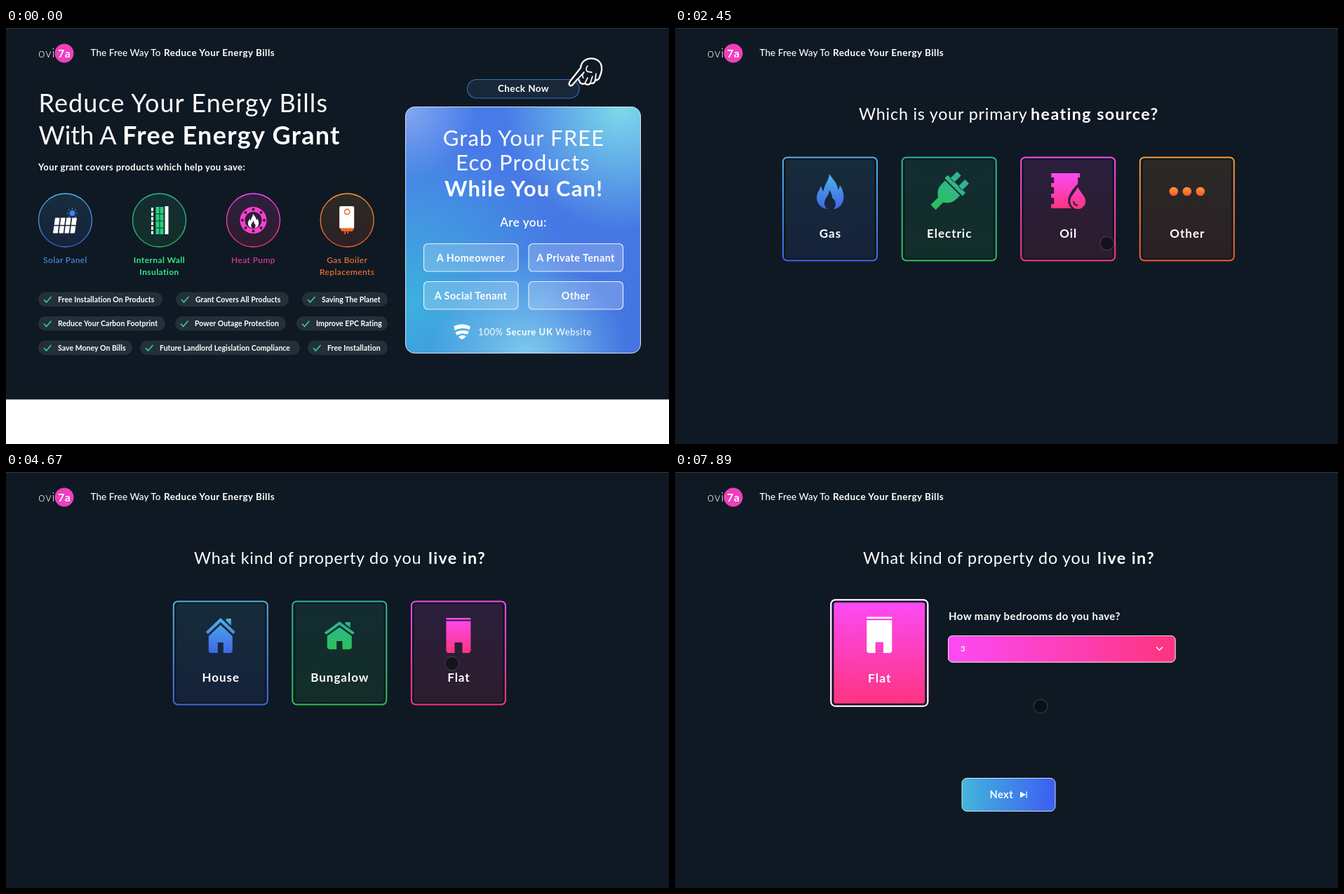
These frames come from a looping animation (945 by 593 pixels, 8000 ms). An HTML page:

```html
<!DOCTYPE html>
<html lang="en">
<head>
<meta charset="utf-8">
<title>Energy grant form</title>
<style>
html, body { margin: 0; width: 100%; height: 100%; overflow: hidden; background: #0f1923; }
svg { display: block; width: 945px; height: 593px; }
text { font-family: Lato, "Open Sans", sans-serif; white-space: pre; }
</style>
</head>
<body>
<svg id="stage" viewBox="0 0 945 593" xmlns="http://www.w3.org/2000/svg"></svg>
<script>
const LOOP = 8000, BG = '#0f1923';
const hues = {
  blue: ['#4fb2e8', '#3f66e6'],
  green: ['#2fb498', '#2bc157'],
  pink: ['#fc4af5', '#fd347f'],
  orange: ['#f79a3b', '#f4572c']
};

// ---------- markup helpers ----------
const text = (x, y, size, str, { w = 700, a = 'start', ls = .03, fill = '#fff', id = '' } = {}) =>
  `<text ${id && `id="${id}"`} x="${x}" y="${y}" font-size="${size}" font-weight="${w}" text-anchor="${a}" letter-spacing="${(ls * size).toFixed(2)}" fill="${fill}">${str}</text>`;
const mid = (x, y, size, str, o = {}) => text(x, y, size, str, { a: 'middle', ...o });
const rect = (x, y, w, h, r, attrs) =>
  `<rect x="${x}" y="${y}" width="${w}" height="${h}" rx="${r}" ${attrs}/>`;
const path = (d, attrs) => `<path d="${d}" ${attrs}/>`;
const circle = (x, y, r, attrs) => `<circle cx="${x}" cy="${y}" r="${r}" ${attrs}/>`;
const group = (id, body, attrs = '') => `<g id="${id}" ${attrs}>${body}</g>`;
const grad = (id, [c1, c2], dir = 'x2="0" y2="1"') =>
  `<linearGradient id="${id}" ${dir}><stop stop-color="${c1}"/><stop offset="1" stop-color="${c2}"/></linearGradient>`;
const glow = (id, color, cx, cy, r, o) =>
  `<radialGradient id="${id}" cx="${cx}" cy="${cy}" r="${r}"><stop stop-color="${color}" stop-opacity="${o}"/><stop offset="1" stop-color="${color}" stop-opacity="0"/></radialGradient>`;

const defs = `<defs>
  ${Object.keys(hues).map(k => grad(k, hues[k])).join('')}
  ${grad('hotRow', hues.pink, '')}
  ${grad('next', ['#43b6dc', '#3c5df2'], '')}
  ${grad('panel', ['#4a7cea', '#4476e0'], 'x2="1" y2="1"')}
  ${glow('glowCorner', '#93b4f2', 0, 0, .3, .8)}
  ${glow('glowTop', '#7fe0ea', .92, 0, .5, .95)}
  ${glow('glowLeft', '#3cb4dc', .02, .8, .68, .95)}
  ${glow('glowBase', '#86d4ee', .52, 1.02, .42, .9)}
  <clipPath id="listClip"><rect id="listMask" x="388" y="230" width="327" height="0"/></clipPath>
</defs>`;

// ---------- icons, centred on 0,0 ----------
const house = 'M0-25L21-5L18-2L0-19L-18-2L-21-5ZM8-24h7v10l-7-7ZM0-15L17 1V21Q17 25 13 25H4V10H-4V25H-13Q-17 25-17 21V1Z';
const dot = x => `M${x - 6.3} 0a6.3 6.3 0 1 0 12.6 0a6.3 6.3 0 1 0-12.6 0Z`;
const flame = 'M-1-25C4-17 12-10 11-2C13-4 14-7 14-9C19-2 21 8 18 15C16 21 10 25 5 25C10 20 8 12 3 9C3 4 1 1-1-2C-1 6-8 9-8 17C-8 21-6 23-4 25C-12 24-19 18-19 9C-19 2-15-2-13-8C-12-4-11-2-9 0C-9-10-2-14-1-25Z';
const icons = {
  Gas: [flame],
  Electric: ['M-12-28h8v14h-8ZM4-28h8v14h-8ZM-18-15H18v6H-18ZM-15-7H15V0C15 9 10 14 5 17V32H-5V17C-10 14-15 9-15 0Z', 'rotate(45)'],
  Oil: ['M-24-26H17v6h-3v9C8-5 0 5 0 13C0 18 2 21 5 24H-24v-6h4v-9h-4v-6h4v-9h-4v-6h4V-20h-4ZM14-6C18 2 25 7 25 14A11 11 0 0 1 3 14C3 7 10 2 14-6ZM7 14H9A5 5 0 0 0 14 19V21A7 7 0 0 1 7 14Z'],
  Other: [dot(-19) + dot(0) + dot(19)],
  House: [house],
  Bungalow: [house, 'scale(1.03 .79)'],
  Flat: ['M-17.5-25h35v2.5h-35ZM-17.5-20.5h35V21q0 4-4 4h-8V10h-11V25h-8q-4 0-4-4Z']
};

// ---------- answer cards ----------
const CARD_TOP = 183.5;
function card(name, hue) {
  const [d, tf = ''] = icons[name];
  const icon = fill => `<g transform="translate(0 -25)">${path(d, `transform="${tf}" fill="${fill}" fill-rule="evenodd"`)}</g>`;
  const frame = stroke => rect(-67, -73.5, 134, 147, 6, `fill="none" stroke="${stroke}" stroke-width="2"`);
  const inner = attrs => rect(-63, -70, 126, 140, 3, attrs);
  return group('card' + name,
    rect(-68, -74.5, 136, 149, 7, `fill="${BG}"`) + frame(`url(#${hue})`) +
    inner(`fill="url(#${hue})" fill-opacity=".12"`) + icon(`url(#${hue})`) +
    group('on' + name, frame('#fff') + inner('fill="url(#pink)"') + icon('#fff'), 'opacity="0"') +
    mid(.5, 41, 17, name, { ls: .058 }));
}

// ---------- landing page ----------
function medallion(x, hue, lines, icon, color, w) {
  return circle(x, 274, 38, `fill="url(#${hue})" fill-opacity=".13" stroke="url(#${hue})" stroke-width="1.3"`) +
    `<g transform="translate(${x} 274)">${icon}</g>` +
    lines.map((s, i) => mid(x, 334.5 + 17.3 * i, 12, s, { w, ls: .033, fill: color })).join('');
}
const ring = (n, r, fn) => Array.from({ length: n }, (_, i) => {
  const a = i * 2 * Math.PI / n;
  return fn(r * Math.cos(a), r * Math.sin(a), a * 180 / Math.PI);
}).join('');

const solar = path('M-14-3H16L13 18H-17Z', 'fill="#fff" stroke="#fff" stroke-linejoin="round"') +
  path('M-17 7.5H15M-7-4L-10 19M1-4L-2 19M9-4L6 19', 'stroke="#142536" stroke-width="1.7"') +
  circle(10, -10, 4, 'fill="#3f86e8"') +
  ring(8, 6.3, (x, y, a) => rect(-.7, -.7, 2, 1.4, .5, `fill="#3f86e8" transform="translate(${10 + x} ${y - 10}) rotate(${a})"`));
const wall = path('M-10-18V20', 'stroke="#fff" stroke-width="3" stroke-dasharray="5 1.7"') +
  rect(-5, -19, 11, 39, 0, 'fill="#2bd07f"') +
  path('M.5-19V20M-5-9H6M-5 1H6M-5 11H6', 'stroke="#123030" stroke-width="1"') +
  rect(8, -20, 5, 40, 0, 'fill="#fff"');
const pump = circle(0, 0, 15.5, 'fill="none" stroke="#f93fd2" stroke-width="7"') +
  ring(8, 15.5, (x, y) => circle(x, y, 2, 'fill="#2b1a35"')) +
  path(flame, 'fill="#fff" transform="translate(0 1) scale(.4)"');
const boiler = rect(-11, -20, 21, 32, 2, 'fill="#fff"') +
  circle(0, -12, 3.6, 'fill="none" stroke="#f4692c" stroke-width="1.6"') +
  path('M-9 12H9L7 15H-7ZM-3 15V20M1 15V19', 'fill="#f4692c" stroke="#f4692c" stroke-width="1.6"');

const pills = [
  [46, 376.5, 177, 'Free Installation On Products'], [242, 376.5, 161, 'Grant Covers All Products'], [422, 376.5, 122, 'Saving The Planet'],
  [46, 411, 181, 'Reduce Your Carbon Footprint'], [241, 411, 158, 'Power Outage Protection'], [414, 411, 130, 'Improve EPC Rating'],
  [46, 445.5, 134, 'Save Money On Bills'], [191, 445.5, 228, 'Future Landlord Legislation Compliance'], [430, 445.5, 114, 'Free Installation']
].map(([x, y, w, s]) => rect(x, y, w, 20.5, 10.2, 'fill="#252f39"') +
  path(`M${x + 8} ${y + 10.5}l3.5 4l7-8`, 'fill="none" stroke="#2fd784" stroke-width="1.5"') +
  text(x + 28, y + 14, 10.5, s, { ls: .005 })).join('');

const choices = [[595, 307, 'A Homeowner'], [744.5, 307, 'A Private Tenant'], [595, 361, 'A Social Tenant'], [744.5, 361, 'Other']]
  .map(([x, y, s]) => rect(x + .5, y + .5, 134.5, 39.5, 6, 'fill="#fff" fill-opacity=".2" stroke="#e6f1ff" stroke-width="1.1"') +
    mid(x + 67.5, y + 25.5, 14.4, s)).join('');

const shield = path('M638.5 425Q650 419.5 661.5 425L661 430Q650 425.5 639.5 431ZM640.5 433.5Q650 429 660 432.5L657.5 437Q650 433.5 642.5 438ZM645 440Q650 436.5 656 439.5Q653 443 649.5 444Q646.5 442.5 645 440Z', 'fill="#fff"');

const hand = path('M804 82Q801.5 80 804 76L819 57Q820 47 829 44Q842 41 848 51Q851 59 846.5 69Q845 75 840 74Q839 80 833.5 78.5Q830 82.5 825.5 79Q819.5 81 817.5 76L815.5 72L808 80.5Q806 83 804 82Z', `fill="${BG}" stroke="#fff" stroke-width="2.3" stroke-linejoin="round"`) +
  path('M815.5 72L824 63M825 79L829 71M833 78L836 69M840 74L841 65M824 63Q820 67 823 71M829 54Q825 59 829 62L835 63', 'fill="none" stroke="#fff" stroke-width="1.7" stroke-linecap="round"');

const landing = rect(0, 529.5, 945, 64, 0, 'fill="#fff"') +
  text(46.5, 120, 36, 'Reduce Your Energy Bills', { w: 400 }) +
  text(46.5, 165.5, 36, 'With A', { w: 400, ls: 0 }) + text(166, 165.5, 36, 'Free Energy Grant', { ls: .036 }) +
  text(46, 202.5, 13, 'Your grant covers products which help you save:') +
  medallion(84.5, 'blue', ['Solar Panel'], solar, '#4a90ee', 500) +
  medallion(218.5, 'green', ['Internal Wall', 'Insulation'], wall, '#2fe98a', 700) +
  medallion(352.5, 'pink', ['Heat Pump'], pump, '#e43aa0', 500) +
  medallion(486.2, 'orange', ['Gas Boiler', 'Replacements'], boiler, '#f6762f', 500) +
  pills +
  rect(657.5, 73.5, 159.5, 26.5, 13.2, 'fill="#182838" stroke="#2f74c4" stroke-width="1.1"') +
  mid(737.5, 91.3, 13.5, 'Check Now') +
  ['panel', 'glowCorner', 'glowTop', 'glowLeft', 'glowBase'].map(f => rect(569.5, 112.5, 335, 351, 13, `fill="url(#${f})"`)).join('') +
  rect(569.5, 112.5, 335, 351, 13, 'fill="none" stroke="#cfe4fb" stroke-width="1"') +
  mid(738, 167.5, 31, 'Grab Your FREE', { w: 400, ls: .035 }) +
  mid(737, 203, 31, 'Eco Products', { w: 400, ls: .038 }) +
  mid(738, 240, 31, 'While You Can!', { ls: .037 }) +
  mid(737.5, 283, 17, 'Are you:', { w: 600 }) + choices + shield +
  text(673, 438, 13, '100% <tspan font-weight="700">Secure UK</tspan> Website', { w: 400, ls: .05 }) +
  group('hand', hand);

// ---------- question pages ----------
const title = (x, a, x2, b) => text(x, 131, 23.3, a, { w: 400, ls: .034 }) + text(x2, 131, 23.3, b, { ls: .06 });
const heating = group('titleHeat', title(262, 'Which is your primary', 507, 'heating source?')) +
  card('Gas', 'blue') + card('Electric', 'green') + card('Other', 'orange') + card('Oil', 'pink');

const listRows = [1, 2, 3, 4, 5].map((n, i) => text(407, 288 + 27.1 * i, 11, n) +
  path(`M390 ${297.5 + 27.1 * i}H712`, `stroke="${['#2e6466', '#3d4d58', '#6d4a86', '#3d4d58', '#8d4686'][i]}"`)).join('');
const dropdown = group('drop',
  text(390, 211, 15, 'How many bedrooms do you have?', { ls: .028 }) +
  rect(389.5, 233.5, 323.5, 37.5, 6, 'fill="#25303a" stroke="#c9ced3"') +
  group('list', rect(389.5, 233.5, 323, 179, 6, 'fill="#283842" stroke="url(#hotRow)" stroke-width="1.1"') +
    path('M390 270.5H712', 'stroke="#b343b0"') + listRows +
    rect(707.5, 274, 2, 70, 1, 'fill="#6b7983"'), 'clip-path="url(#listClip)"') +
  group('hot', rect(389.5, 233.5, 323.5, 37.5, 6, 'fill="url(#hotRow)" stroke="#fbd7ea"')) +
  text(407, 255.5, 11.5, 'Select number...', { id: 'value' }) +
  path('M686 249.5l4.5 4.5l4.5-4.5', 'fill="none" stroke="#fff" stroke-width="1.5"'));
const next = group('nextBtn', rect(409, 436.5, 133, 47, 7, 'fill="url(#next)" stroke="#cfe3fb"') +
  text(448.5, 465, 14.5, 'Next', { ls: .035 }) +
  path('M492 455.5L500 460L492 464.5ZM500.5 455.5h1.3v9h-1.3Z', 'fill="#fff"'));
const property = title(268, 'What kind of property do you', 602, 'live in?') +
  dropdown + card('House', 'blue') + card('Bungalow', 'green') + card('Flat', 'pink') + next;

const header = rect(0, 0, 945, 1, 0, 'fill="#33383d"') +
  circle(83, 36, 13.5, 'fill="#ef3fbd"') +
  text(46, 41.5, 17, 'ovi', { w: 300, ls: .05 }) + text(74, 41.5, 16, '7a') +
  text(120.5, 40, 13.5, 'The Free Way To', { w: 500, ls: .005 }) + text(225, 40, 13.5, 'Reduce Your Energy Bills', { ls: .034 });

const stage = document.getElementById('stage');
stage.innerHTML = defs + rect(0, 0, 945, 593, 0, `fill="${BG}"`) +
  group('landing', landing) + group('heating', heating) + group('property', property) + header +
  group('cursor', circle(0, 0, 9.8, 'id="disc" stroke-width="1.3"'));

// ---------- motion ----------
const el = id => document.getElementById(id);
const ramp = (t, start, dur) => Math.min(1, Math.max(0, (t - start) / dur));
const swing = (t, start, dur) => .5 - .5 * Math.cos(Math.PI * ramp(t, start, dur));
const show = (id, on) => el(id).setAttribute('display', on ? 'inline' : 'none');
const fade = (id, o) => el(id).setAttribute('opacity', o.toFixed(3));
const move = (id, x, y, s = 1) => el(id).setAttribute('transform', `translate(${x.toFixed(2)} ${y.toFixed(2)}) scale(${s.toFixed(4)})`);

function place(name, x, dy, opacity, sel = 0) {
  move('card' + name, x, CARD_TOP + 74.5 + dy, 1 + .03 * sel);
  fade('card' + name, opacity);
  fade('on' + name, sel);
}

// start, end, x, y
const trail = [[70, 940, 672, 328], [2130, 2740, 568, 289], [4400, 4860, 674, 264], [5400, 6030, 626, 259], [6660, 7030, 521, 334]];
function pointer(t) {
  let x = 896, y = 612;
  for (const [from, to, tx, ty] of trail) {
    const k = swing(t, from, to - from);
    x += (tx - x) * k;
    y += (ty - y) * k;
  }
  return [x, y];
}

function render(t) {
  const first = t < 1640;
  show('landing', first);
  show('heating', !first && t < 4400);
  show('property', t > 3576);

  const bob = 10 - 10 * Math.cos(2 * Math.PI * (t + 174) / 1744);
  move('hand', bob - 2, 2 - bob);

  const leave = swing(t, 3005, 800), turn = swing(t, 3576, 800);
  fade('titleHeat', 1 - leave);
  place('Gas', 221, 150 * leave, 1 - leave);
  place('Electric', 390.7, 150 * leave, 1 - leave);
  place('Other', 729.8, 150 * leave, 1 - leave);
  place('Oil', 560.2, -150 * turn, 1 - turn, ramp(t, 2930, 530));

  fade('property', turn);
  const drop = swing(t, 4998, 800), slide = swing(t, 4988, 400);
  place('House', 305.8, 150 * drop, 1 - drop);
  place('Bungalow', 475.3, 150 * drop, 1 - drop);
  place('Flat', 644.9 - 353.6 * slide, 0, 1, ramp(t, 4860, 490));
  move('drop', 0, -80 * (1 - slide));
  fade('drop', slide);

  const chosen = t >= 7080;
  const open = chosen ? 1 - ramp(t, 7080, 140) : swing(t, 6250, 240);
  show('list', open > 0);
  el('listMask').setAttribute('height', 42 + 142 * open);
  fade('list', Math.min(1, open * 3));
  fade('hot', ramp(t, 7110, 760));
  el('value').textContent = chosen ? '3' : 'Select number...';
  fade('nextBtn', swing(t, 7150, 650));

  const [x, y] = pointer(t), press = first && t > 1420;
  move('cursor', x, y, press ? 1.12 : 1);
  const disc = el('disc');
  disc.setAttribute('fill', press ? 'rgba(176,168,32,.78)' : 'rgba(6,10,15,.58)');
  disc.setAttribute('stroke', press ? 'rgba(150,150,60,.8)' : 'rgba(66,76,85,.65)');
}

const t0 = performance.now();
function tick() {
  render((performance.now() - t0) % LOOP);
  requestAnimationFrame(tick);
}
tick();
</script>
</body>
</html>
```
